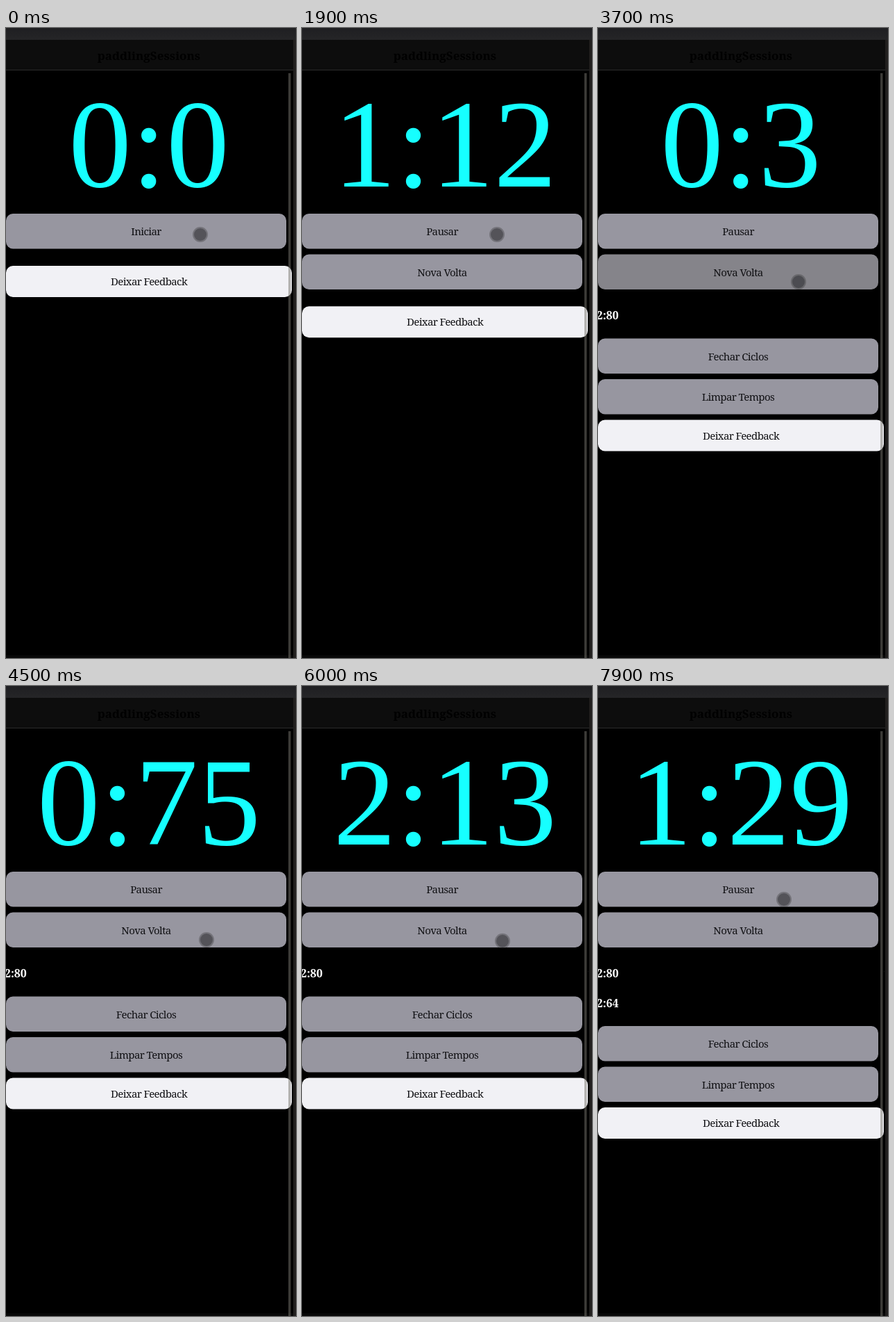
An HTML page that plays this animation: 418x906 px, repeating every 8000 ms.

```html
<!DOCTYPE html>
<html lang="pt">
<head>
<meta charset="utf-8">
<style>
html, body { margin: 0; width: 100%; height: 100%; overflow: hidden; background: #000; }
svg { display: block; width: 418px; height: 906px; }
text { font: 15px "Noto Serif", serif; text-anchor: middle; }
.label { letter-spacing: -.6px; fill: #111114; }
.title { font-size: 17px; font-weight: 700; fill: #000; }
.lap { font-size: 16px; font-weight: 700; fill: #fff; text-anchor: start; }
#clock { font: 181px "Liberation Serif", "Times New Roman", serif; fill: #16ffff; }
</style>
</head>
<body>
<svg viewBox="0 0 418 906">
  <defs>
    <linearGradient id="bar" x2="0" y2="1">
      <stop stop-color="#1f1f22"/><stop offset="1" stop-color="#252527"/>
    </linearGradient>
  </defs>
  <rect width="418" height="906"/>
  <rect y="17" width="414" height="43" fill="#0d0d0d"/>
  <rect y="60" width="414" height="1" fill="#2b2b2b"/>
  <rect y="902" width="414" height="4" fill="#080808"/>
  <rect x="414" y="17" width="4" height="889" fill="#211f1e"/>
  <rect width="418" height="17" fill="url(#bar)"/>
  <text class="title" x="206" y="46">paddlingSessions</text>
  <text id="clock" x="206" y="228"></text>
  <g id="list"></g>
  <rect x="407" y="65" width="3.5" height="841" fill="#78766f" fill-opacity=".5"/>
  <g id="pointer">
    <circle r="11" fill="#333" fill-opacity=".35"/>
    <circle r="9" fill="#202024" fill-opacity=".38"/>
  </g>
</svg>
<script>
const LOOP = 8000, STEP = 100;
const START = 740, LAPS = [[3668, "2:80"], [6558, "2:64"]];

// [time, hundredths]
const CLOCK = [[START, 0], [1900, 112], [2700, 189], [3667, 280], [3668, 0],
  [5300, 148], [6557, 264], [6558, 0], [7900, 129]];
// [time, x, y]
const POINTER = [[800, 280, 297], [1600, 281, 297], [2000, 281, 297], [2300, 288, 347],
  [2500, 289, 361], [2600, 289, 365], [5300, 289, 365], [6100, 289, 367],
  [7200, 289, 367], [7900, 268, 307]];

const $ = id => document.getElementById(id);

function track(keys, t, col) {
  const i = keys.findIndex(k => k[0] > t);
  if (i < 0) return keys[keys.length - 1][col];
  if (i === 0) return keys[0][col];
  const a = keys[i - 1], b = keys[i];
  return a[col] + (b[col] - a[col]) * (t - a[0]) / (b[0] - a[0]);
}

// Press highlight: full for a moment after the tap, then fading.
function press(t, tap) {
  const d = t - tap;
  return d < 0 ? 0 : Math.min(1, Math.max(0, (300 - d) / 200));
}

function button(y, label, pressed = 0) {
  const mix = (a, b) => Math.round(a + (b - a) * pressed);
  const fill = `rgb(${mix(151, 133)},${mix(150, 132)},${mix(160, 138)})`;
  return `<rect y="${y}" width="404" height="50.5" rx="10" fill="${fill}"/>
    <text class="label" x="202" y="${y + 31}">${label}</text>`;
}

function feedback(y) {
  return `<rect y="${y}" width="412" height="45" rx="10" fill="#f1f1f5"/>
    <text class="label" x="206" y="${y + 28}">Deixar Feedback</text>`;
}

function list(t) {
  if (t < START) return button(267, "Iniciar") + feedback(342);
  const laps = LAPS.filter(l => t >= l[0]);
  const lapPress = Math.max(...LAPS.map(l => press(t, l[0])));
  let out = button(267, "Pausar", press(t, START)) + button(325.5, "Nova Volta", lapPress);
  if (!laps.length) return out + feedback(400.3);
  laps.forEach((l, i) => {
    out += `<text class="lap" x="-2" y="${419 + i * 42.5}">${l[1]}</text>`;
  });
  const y = 404 + laps.length * 42.5;
  return out + button(y, "Fechar Ciclos") + button(y + 58.5, "Limpar Tempos") + feedback(y + 117);
}

function draw(t) {
  const v = Math.round(track(CLOCK, t, 1));
  $("clock").textContent = Math.floor(v / 100) + ":" + v % 100;
  $("list").innerHTML = list(t);
  $("pointer").setAttribute("transform", `translate(${track(POINTER, t, 1)} ${track(POINTER, t, 2)})`);
}

let start, last;
function frame(now) {
  start ??= now;
  const t = Math.floor((now - start) % LOOP / STEP) * STEP;
  if (t !== last) draw(last = t);
  requestAnimationFrame(frame);
}
draw(0);
requestAnimationFrame(frame);
</script>
</body>
</html>
```
